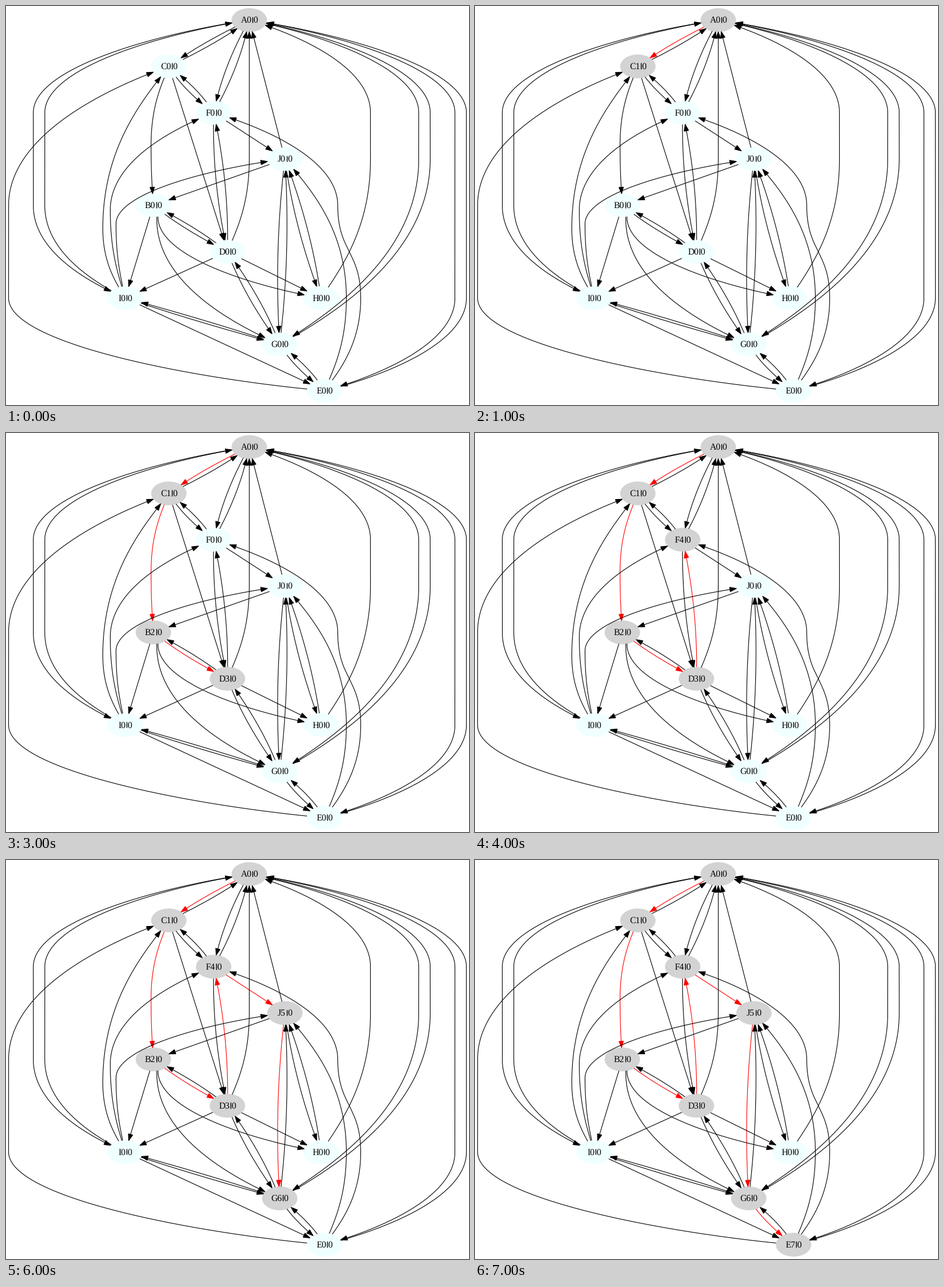
These frames come from a looping animation (806 by 695 pixels, 8 s). A matplotlib script:

```python
from itertools import pairwise

import matplotlib.pyplot as plt
import numpy as np
from matplotlib.animation import FuncAnimation
from matplotlib.patches import Ellipse, Polygon

W, H, DPI = 806, 695, 64
PT = 72 / DPI  # points per pixel
UNIT = 1.12    # pen width, sets the scale of every part
RX, RY = 27 * UNIT, 18 * UNIT
TOP, ROW = 24, 80.7
LANE = 10      # sideways shift of each edge in a two-way pair
HEAD, HALF = 10 * UNIT, 3.5 * UNIT
EM = 14 * UNIT
IDLE, SEEN = "#f0ffff", "#d3d3d3"
VISITS = "CBDFJGE"

# x and row of each node
NODES = {"A": (423, 0), "C": (283, 1), "F": (361, 2), "J": (485, 3),
         "B": (256, 4), "D": (385, 5), "H": (548, 6), "I": (207, 6),
         "G": (476, 7), "E": (554, 8)}

TWO_WAY = "AC AF CF FD BD DG JH JG IG GE AI AG AE".split()
ONE_WAY = "CD FJ JA JB BI DI DH IE CB DA BG BH IC IF IJ EF EJ EC HA".split()
EDGES = TWO_WAY + [key[::-1] for key in TWO_WAY] + ONE_WAY

# x and row of the places where a detour runs vertically
DETOURS = {
    "AI": [(57, 2), (57, 4)], "AG": [(728, 2), (728, 3)],
    "AE": [(791, 2), (791, 6)], "EC": [(4, 6), (4, 4)],
    "HA": [(634, 3), (634, 2)], "EF": [(617, 6), (577, 4)],
    "EJ": [(592, 6)], "DA": [(423, 3)], "CB": [(252, 2.7)],
    "BG": [(262, 4.3)], "BH": [(264, 4.25)], "IC": [(168, 4.5)],
    "IF": [(181, 4.1)], "IJ": [(191, 4.4)],
}

plt.rcParams["text.hinting"] = "none"
plt.rcParams["font.family"] = ["Liberation Serif", "DejaVu Serif"]

fig = plt.figure(figsize=(W / DPI, H / DPI), dpi=DPI, facecolor="white")
ax = fig.add_axes([0, 0, 1, 1])
ax.set_xlim(-.5, W - .5)
ax.set_ylim(H - .5, -.5)
ax.axis("off")


def place(x, row):
    return np.array([x, TOP + ROW * row])


def cubic(p0, p1, p2, p3):
    t = np.linspace(0, 1, 400)[:, None]
    s = 1 - t
    return s**3 * p0 + 3 * s * s * t * p1 + 3 * s * t * t * p2 + t**3 * p3


def lean(node, via):
    """Control point beside a node: flat for wide turns, steeper for tall."""
    dx, dy = via - node
    tall = abs(dy) / (abs(dx) + abs(dy))
    return node + (.4 * dx, (.08 + .18 * tall) * dy)


def trace(key):
    """Sample an edge from centre to centre, then cut it at both ovals."""
    a, b = (place(*NODES[name]) for name in key)
    shift = np.zeros(2)
    if key[::-1] in EDGES:
        shift[0] = -LANE if b[1] > a[1] else LANE
    stops = DETOURS.get(key) or DETOURS.get(key[::-1], [])[::-1]
    if stops:
        knots = [a] + [place(*stop) + shift for stop in stops] + [b]
        last = len(knots) - 2
        parts = []
        for i, (p, q) in enumerate(pairwise(knots)):
            mid = (p[1] + q[1]) / 2
            c1 = lean(p, q) if i == 0 else (p[0], mid)
            c2 = lean(q, p) if i == last else (q[0], mid)
            parts.append(cubic(p, np.array(c1), np.array(c2), q))
        points = np.concatenate(parts)
    else:
        third = (b - a) / 3
        points = cubic(a, a + third + shift, b - third + shift, b)
    for centre in (a, b):
        reach = np.hypot(*((points - centre) / (RX, RY)).T)
        points = points[reach >= 1]
    return points


def add_edge(key):
    points = trace(key)
    tip = points[-1]
    body = points[np.hypot(*(points - tip).T) >= HEAD]
    base = body[-1]
    ux, uy = (tip - base) / np.hypot(*(tip - base))
    side = HALF * np.array([-uy, ux])
    line, = ax.plot(*body.T, lw=UNIT * PT, solid_capstyle="butt", zorder=2)
    head = Polygon([tip, base + side, base - side], lw=UNIT * PT,
                   joinstyle="miter", zorder=2)
    ax.add_patch(head)
    return line, head


def add_node(name):
    x, y = place(*NODES[name])
    oval = Ellipse((x, y), 2 * RX + UNIT, 2 * RY + UNIT, lw=0, zorder=1)
    ax.add_patch(oval)
    base = y + .3 * EM
    style = dict(fontsize=EM * PT, va="baseline", ha="left", zorder=3)
    label = ax.text(x, base, name + "0", **style)
    half = (label.get_window_extent().width + .7 * EM) / 2
    label.set_x(x - half)
    ax.text(x + half - .5 * EM, base, "0", **style)
    bar = x + half - .6 * EM
    ax.plot([bar, bar], [base, base - .68 * EM], color="black",
            lw=.09 * EM * PT, solid_capstyle="butt", zorder=3)
    return oval, label


nodes = {name: add_node(name) for name in NODES}
edges = {key: add_edge(key) for key in EDGES}


def update(step):
    route = "A" + VISITS[:step]
    taken = {a + b for a, b in pairwise(route)}
    for name, (oval, label) in nodes.items():
        seen = name in route
        oval.set_facecolor(SEEN if seen else IDLE)
        label.set_text(f"{name}{route.index(name) if seen else 0}")
    for key, parts in edges.items():
        for part in parts:
            part.set_color("red" if key in taken else "black")
    return []


anim = FuncAnimation(fig, update, frames=len(VISITS) + 1, interval=1000,
                     init_func=lambda: update(0), repeat=True, repeat_delay=0)
plt.show()
```
